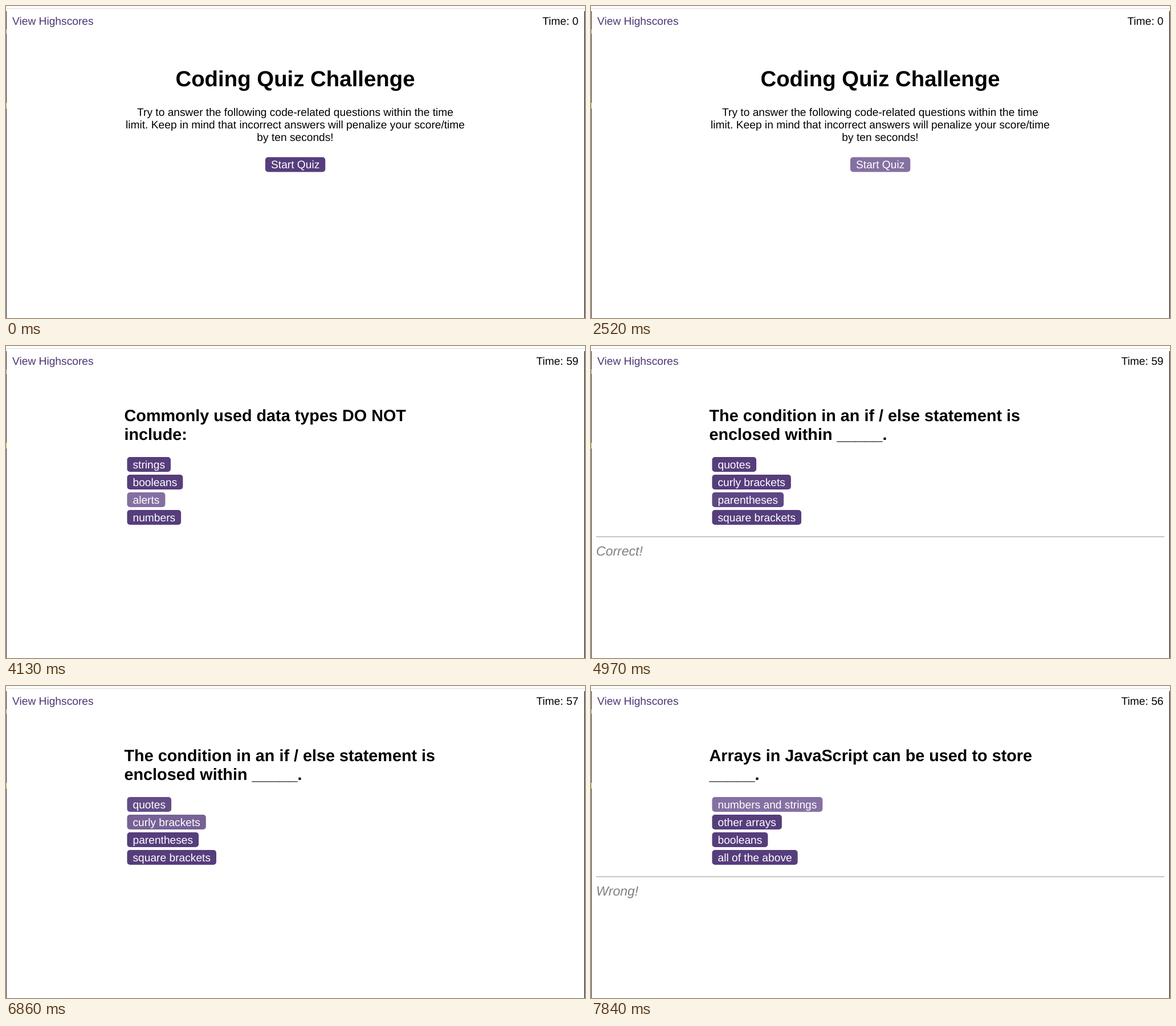
Animation, 1016 px wide and 548 px high, one loop 8000 ms. Source, as an HTML page with a canvas:

```html
<!DOCTYPE html>
<html lang="en">
<head>
<meta charset="utf-8">
<title>Coding Quiz</title>
<style>
  html, body { margin: 0; width: 100%; height: 100%; overflow: hidden; background: #fff; }
  canvas { display: block; }
</style>
</head>
<body>
<canvas id="stage" width="1016" height="548"></canvas>
<script>
const ctx = document.getElementById('stage').getContext('2d');
const LOOP = 8000;
const FAMILY = '"Liberation Sans", Arial, sans-serif';
const DARK = [86, 61, 124], LIGHT = [133, 112, 162];

const questions = {
  types: {
    title: ['Commonly used data types DO NOT', 'include:'],
    answers: ['strings', 'booleans', 'alerts', 'numbers']
  },
  condition: {
    title: ['The condition in an if / else statement is', 'enclosed within _____.'],
    answers: ['quotes', 'curly brackets', 'parentheses', 'square brackets']
  },
  arrays: {
    title: ['Arrays in JavaScript can be used to store', '_____.'],
    answers: ['numbers and strings', 'other arrays', 'booleans', 'all of the above']
  }
};

// Each step changes only the listed parts; hover maps a button index to its highlight, 0 to 1.
const steps = [
  { at: 0, page: 'intro', time: 0, hover: {}, note: '' },
  { at: 2450, hover: { 0: 0.5 } },
  { at: 2520, hover: { 0: 1 } },
  { at: 3080, page: 'types', hover: {} },
  { at: 4060, time: 59, hover: { 2: 0.5 } },
  { at: 4130, hover: { 2: 1 } },
  { at: 4970, page: 'condition', note: 'Correct!', hover: { 2: 0.2 } },
  { at: 5040, hover: { 2: 1 } },
  { at: 5180, time: 58 },
  { at: 5600, hover: { 1: 0.25, 2: 0.75 } },
  { at: 5670, hover: { 1: 0.92 } },
  { at: 6020, note: '' },
  { at: 6230, time: 57 },
  { at: 6860, hover: { 0: 0.3, 1: 0.7 } },
  { at: 6930, hover: { 0: 1 } },
  { at: 7280, time: 56 },
  { at: 7770, page: 'arrays', note: 'Wrong!', hover: { 0: 0.2 } },
  { at: 7840, hover: { 0: 1 } }
];

function stateAt(t) {
  return Object.assign({}, ...steps.filter(s => s.at <= t));
}

function text(str, x, y, { size = 19.2, style = '', color = '#000', align = 'left' } = {}) {
  ctx.font = `${style} ${size}px ${FAMILY}`;
  ctx.fillStyle = color;
  ctx.textAlign = align;
  ctx.fillText(str, x, y);
}

function rect(x, y, w, h, color) {
  ctx.fillStyle = color;
  ctx.fillRect(x, y, w, h);
}

function button(label, x, y, glow = 0) {
  ctx.font = `19.2px ${FAMILY}`;
  const width = ctx.measureText(label).width + 20;
  const rgb = DARK.map((c, i) => Math.round(c + (LIGHT[i] - c) * glow));
  ctx.fillStyle = `rgb(${rgb})`;
  ctx.beginPath();
  ctx.roundRect(x, y, width, 26, 5);
  ctx.fill();
  text(label, x + 10, y + 19.5, { color: '#fff' });
}

function drawFrame() {
  rect(0, 0, 1016, 548, '#fff');
  rect(0, 0, 1016, 4, '#fdfdfd');
  rect(0, 4, 1016, 1, '#dcdcdc');
  rect(0, 9, 1, 539, '#2b2b2e');
  rect(0, 41, 1, 8, '#b08a4a');
  rect(0, 170, 1, 10, '#d9a046');
  rect(1014, 9, 1, 539, '#c4c4c4');
  rect(1015, 9, 1, 539, '#26262a');
}

function drawIntro(hover) {
  text('Coding Quiz Challenge', 507.5, 141, { size: 38.4, style: 'bold', align: 'center' });
  const lines = [
    'Try to answer the following code-related questions within the time',
    'limit. Keep in mind that incorrect answers will penalize your score/time',
    'by ten seconds!'
  ];
  lines.forEach((line, i) => text(line, 507.5, 192.6 + i * 22, { align: 'center' }));
  button('Start Quiz', 455, 265.5, hover[0]);
}

function drawQuestion({ title, answers }, hover) {
  title.forEach((line, i) => text(line, 207.5, 131.5 + i * 33, { size: 28.8, style: 'bold' }));
  answers.forEach((label, i) => button(label, 212.5, 195 + i * 31, hover[i]));
}

function draw(t) {
  const { page, time, hover, note } = stateAt(t);
  ctx.textRendering = 'geometricPrecision';
  drawFrame();
  text('View Highscores', 11, 32.6, { color: '#4e3674' });
  text(`Time: ${time}`, 1004.5, 32.6, { align: 'right' });
  if (page === 'intro') drawIntro(hover);
  else drawQuestion(questions[page], hover);
  if (note) {
    rect(9, 334, 997, 2, '#c8c8c8');
    text(note, 9, 367.5, { size: 23.04, style: 'italic', color: '#808080' });
  }
}

const start = performance.now();
function tick() {
  draw((performance.now() - start) % LOOP);
  requestAnimationFrame(tick);
}
tick();
</script>
</body>
</html>
```
